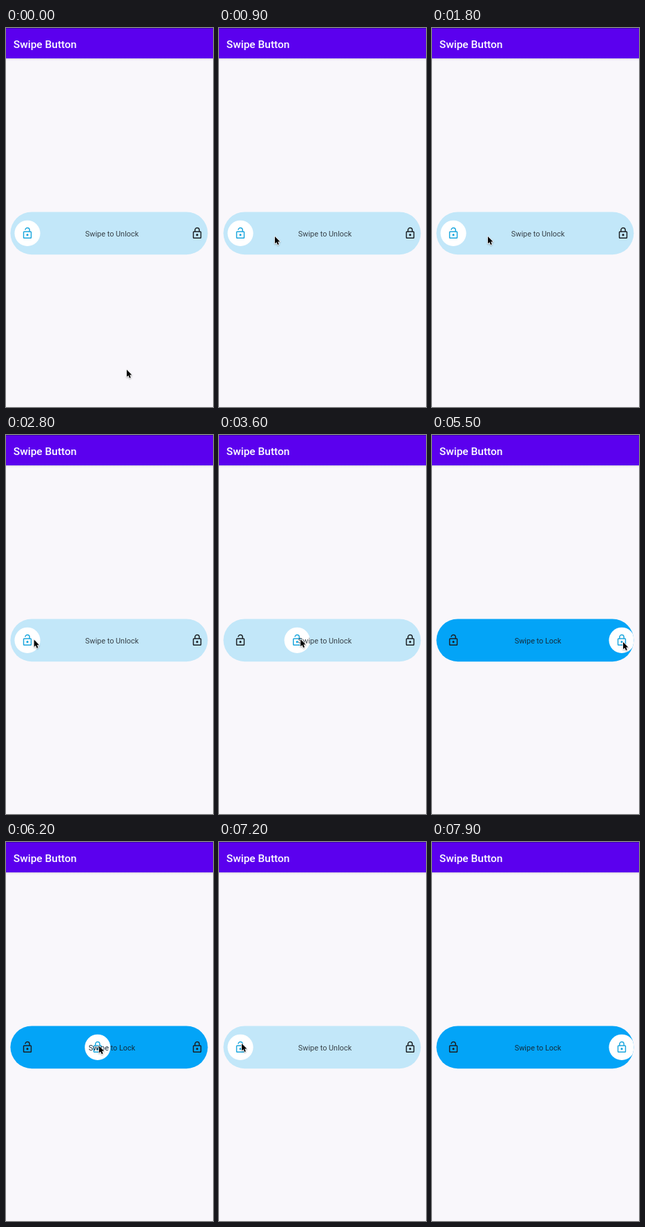
An HTML page with a canvas that plays this animation: 300x549 px, repeating every 8000 ms.

```html
<!DOCTYPE html>
<html lang="en">
<head>
<meta charset="utf-8">
<title>Swipe Button</title>
<style>
  html, body { margin: 0; width: 100%; height: 100%; overflow: hidden; background: #f9f7fb; }
  canvas { display: block; width: 300px; height: 549px; }
</style>
</head>
<body>
<canvas id="stage"></canvas>
<script>
const W = 300, H = 549, LOOP = 8000, STEP = 100;
const DP = 0.78;
const LEFT = 31, TRAVEL = 244, MID_Y = 297.3;
const PAGE = '#f9f7fb', LIGHT = '#c2e7f9', BLUE = '#03a4f7';
const ICON_BLUE = '#1ba6dd', INK = '#1b2024';

const canvas = document.getElementById('stage');
const ctx = canvas.getContext('2d');
const scale = window.devicePixelRatio || 1;
canvas.width = W * scale;
canvas.height = H * scale;

// Smooth 0 to 1 between two times
function ease(t, from, to) {
  const u = Math.min(1, Math.max(0, (t - from) / (to - from)));
  return u * u * (3 - 2 * u);
}

function stateAt(t) {
  const approach = ease(t, 0, 900);
  const grab = ease(t, 2000, 3000);
  const unlock = 0.52 * ease(t, 3300, 3800) + 0.48 * ease(t, 3875, 4615);
  const overshoot = ease(t, 4150, 4400);
  const comeBack = ease(t, 4600, 5300);
  const lock = ease(t, 5700, 6600);
  const again = ease(t, 7300, 7800);
  const dragged = TRAVEL * (unlock - lock + again);
  return {
    locked: (t >= 4600 && t < 6600) || t >= 7700,
    knobX: LEFT + dragged,
    pointerX: 175 - 94 * approach - 45 * grab + dragged + 35 * overshoot - 38 * comeBack,
    pointerY: 495 - 193 * approach - 6 * grab + 15 * overshoot - 11 * comeBack
      - 8 * lock + 13 * again,
    pointerShown: t < 7900
  };
}

function text(label, x, y, font, color, align) {
  ctx.font = font + ' Roboto, sans-serif';
  ctx.fillStyle = color;
  ctx.textAlign = align;
  ctx.fillText(label, x, y);
}

function disc(x, y, r) {
  ctx.beginPath();
  ctx.arc(x, y, r, 0, Math.PI * 2);
  ctx.fill();
}

// Padlock on a 24-unit grid
function padlock(x, color, open) {
  ctx.save();
  ctx.translate(x, MID_Y);
  ctx.scale(DP, DP);
  ctx.translate(-12, -12);
  ctx.strokeStyle = ctx.fillStyle = color;
  ctx.lineWidth = 1.9;
  ctx.beginPath();
  ctx.roundRect(5, 9, 14, 12, 1);
  ctx.stroke();
  disc(12, 15, 2);
  ctx.beginPath();
  if (!open) ctx.moveTo(8, 9);
  ctx.arc(12, 6, 4, Math.PI, 0);
  ctx.lineTo(16, 9);
  ctx.stroke();
  ctx.restore();
}

function header() {
  const shadow = ctx.createLinearGradient(0, 44, 0, 47);
  shadow.addColorStop(0, 'rgba(60, 40, 90, .16)');
  shadow.addColorStop(1, 'rgba(60, 40, 90, 0)');
  ctx.fillStyle = shadow;
  ctx.fillRect(0, 44, W, 3);
  ctx.fillStyle = '#5b00ee';
  ctx.fillRect(0, 0, W, 44);
  ctx.fillStyle = '#3d00b5';
  ctx.fillRect(0, 0, W, 1);
  text('Swipe Button', 10.8, 29, '500 15.5px', '#fff', 'left');
}

function swipeButton(knobX, locked) {
  ctx.save();
  ctx.beginPath();
  ctx.roundRect(6.4, 266.4, 286, 61.8, 30.9);
  ctx.fillStyle = locked ? BLUE : LIGHT;
  ctx.fill();
  ctx.clip();
  padlock(LEFT, INK, true);
  padlock(LEFT + 246, INK, false);
  ctx.fillStyle = '#fff';
  disc(knobX, MID_Y, 18.6);
  padlock(knobX, ICON_BLUE, !locked);
  text(locked ? 'Swipe to Lock' : 'Swipe to Unlock', 153.5, 301.8,
    '400 10.9px', locked ? '#132c3d' : '#374148', 'center');
  ctx.restore();
}

function pointer(x, y) {
  ctx.save();
  ctx.translate(x, y);
  ctx.scale(0.94, 0.94);
  ctx.beginPath();
  [[0, 0], [0, 11], [2.5, 8.7], [4.3, 12.8], [6.2, 12], [4.5, 8], [7.9, 8]]
    .forEach(([px, py]) => ctx.lineTo(px, py));
  ctx.closePath();
  ctx.lineJoin = 'round';
  ctx.shadowColor = 'rgba(0, 0, 0, .3)';
  ctx.shadowBlur = 2 * scale;
  ctx.shadowOffsetY = scale;
  ctx.strokeStyle = '#fff';
  ctx.lineWidth = 1.6;
  ctx.stroke();
  ctx.shadowColor = 'transparent';
  ctx.fillStyle = '#000';
  ctx.fill();
  ctx.restore();
}

function draw(now) {
  const t = Math.floor((now % LOOP) / STEP) * STEP;
  const state = stateAt(t);
  ctx.setTransform(scale, 0, 0, scale, 0, 0);
  ctx.fillStyle = PAGE;
  ctx.fillRect(0, 0, W, H);
  header();
  swipeButton(state.knobX, state.locked);
  if (state.pointerShown) pointer(state.pointerX, state.pointerY);
}

const start = performance.now();
function tick() {
  draw(performance.now() - start);
  requestAnimationFrame(tick);
}
tick();
</script>
</body>
</html>
```
